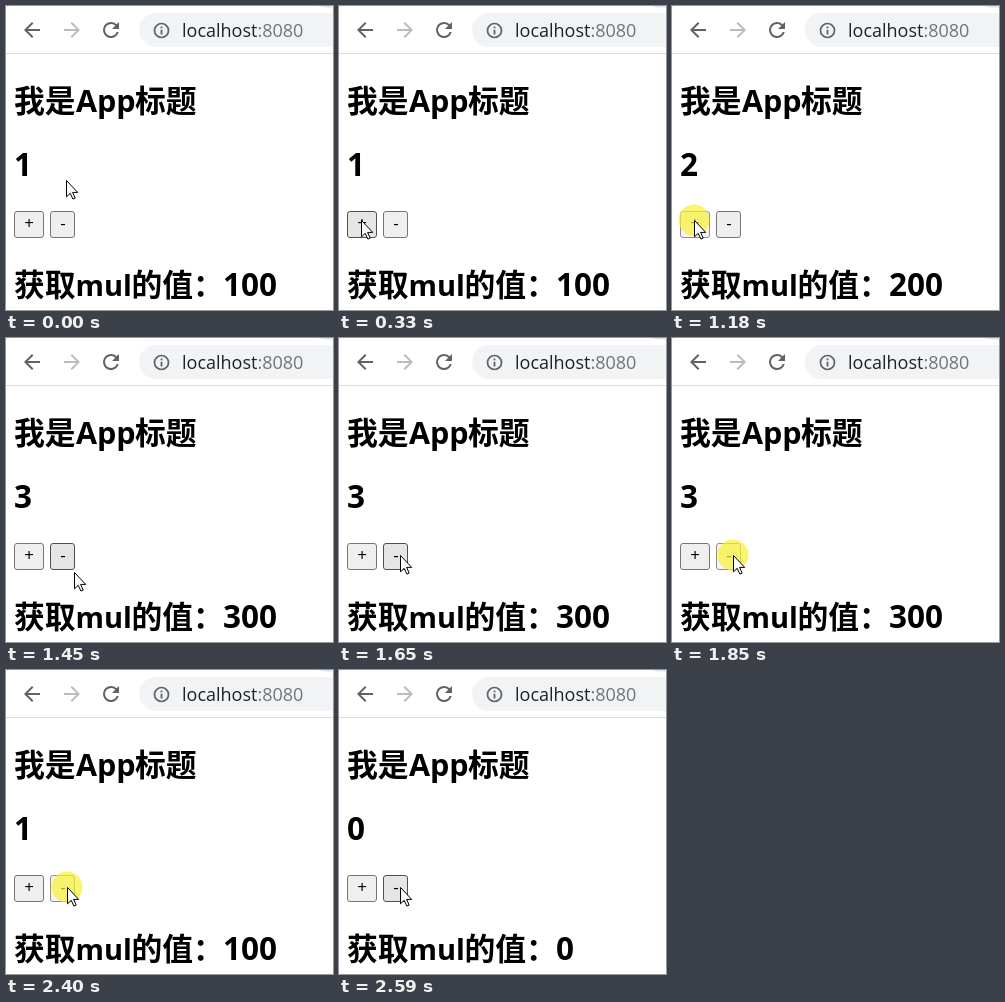
Animation, 327 px wide and 304 px high, one loop 3120 ms. Source, as an HTML page:

```html
<!DOCTYPE html>
<html lang="zh-CN">
<head>
<meta charset="utf-8">
<title>App</title>
<style>
  html, body { margin: 0; width: 100%; height: 100%; overflow: hidden; background: #fff; }
  svg { display: block; width: 100%; height: 100%; }
  text { white-space: pre; }
  .cjk { font: 700 30.8px "Noto Sans CJK SC", "Noto Sans CJK", sans-serif; }
  .latin { font: 700 30.5px "Open Sans", "Noto Sans", sans-serif; }
  .small { font-size: 29px; }
  .num { font-size: 31.5px; }
  .url { font: 18px "Open Sans", "Noto Sans", sans-serif; fill: #202124; }
  .port { fill: #70757a; }
  .btn rect { fill: #efefef; stroke: #767676; }
  .btn text { font: 17px "Open Sans", "Noto Sans", sans-serif; text-anchor: middle; }
  .btn.hover rect { fill: #e5e5e5; stroke: #4f4f4f; }
  .btn.press rect { fill: #f5f5f5; stroke: #8d8d8d; }
</style>
</head>
<body>
<svg viewBox="0 0 327 304">
  <defs>
    <path id="arrow" d="M20 11H7.83l5.59-5.59L12 4l-8 8 8 8 1.41-1.41L7.83 13H20z"/>
  </defs>
  <rect width="327" height="304" fill="#fff"/>

  <!-- browser bar -->
  <path d="M0 0h3l-3 1zM313 0h14v1.5q-11 0-14-1.5z" fill="#dee1e6"/>
  <rect y="47" width="327" height="1" fill="#dadce0"/>
  <rect x="133" y="7" width="260" height="34" rx="17" fill="#f1f3f4"/>
  <g fill="#5f6368">
    <use href="#arrow" x="14" y="12"/>
    <use href="#arrow" transform="translate(78 12) scale(-1 1)" fill="#babcbe"/>
    <path transform="translate(93 12)" d="M17.65 6.35A7.96 7.96 0 0 0 12 4a8 8 0 1 0 7.73 10h-2.08A6 6 0 1 1 12 6c1.66 0 3.14.69 4.22 1.78L13 11h7V4z"/>
    <circle cx="155.5" cy="24.5" r="7" fill="none" stroke="#5f6368" stroke-width="1.7"/>
    <path d="M154.6 20.5h1.8v1.8h-1.8zM154.6 23.8h1.8v4.7h-1.8z"/>
  </g>
  <text class="url" x="176" y="31">localhost<tspan class="port">:8080</tspan></text>

  <!-- page -->
  <text y="106"><tspan class="cjk" x="8">我是</tspan><tspan class="latin" x="70">App</tspan><tspan class="cjk" x="129">标题</tspan></text>
  <text id="count" class="latin num" x="8" y="170"></text>
  <g id="plus"><rect x="8.5" y="205.5" width="29" height="26" rx="2.5"/><text x="23" y="223">+</text></g>
  <g id="minus"><rect x="44.5" y="205.5" width="24" height="26" rx="2.5"/><text x="57" y="223">-</text></g>
  <text y="289.5"><tspan class="cjk" x="8">获取</tspan><tspan class="latin small" x="69.5">mul</tspan><tspan class="cjk" x="125.5">的值：</tspan><tspan id="mul" class="latin num" x="217"></tspan></text>

  <!-- pointer -->
  <g id="pointer">
    <circle id="glow" r="15.5" fill="#f8f032" fill-opacity=".7"/>
    <path d="M.5.5v16.3l3.7-3.5 2.7 5.8 2.3-1-2.6-5.7h5.1z" fill="#fff" stroke="#000"/>
  </g>
</svg>
<script>
  const LOOP = 3120;
  const $ = id => document.getElementById(id);

  // [time, x, y] of the pointer, held until the next entry
  const moves = [
    [0, 60, 174], [70, 58, 178], [140, 50, 190], [200, 38, 203], [270, 27, 211], [330, 22, 214],
    [1380, 48, 228], [1450, 68, 234], [1520, 65, 228], [1580, 62, 221], [1650, 61, 217]
  ];
  const hovers = [[0, ""], [270, "plus"], [1380, ""], [1450, "minus"]];
  // [press, release, step]
  const clicks = [[590, 720, 1], [1180, 1320, 1], [1850, 1920, -1], [2070, 2200, -1], [2400, 2590, -1]];

  const at = (list, t) => list.findLast(entry => entry[0] <= t);

  function render(t) {
    const [, x, y] = at(moves, t);
    const hover = at(hovers, t)[1];
    const pressed = clicks.some(([down, up]) => t >= down && t < up);
    const count = clicks.reduce((n, [, up, step]) => t >= up ? n + step : n, 1);

    $("count").textContent = count;
    $("mul").textContent = count * 100;
    for (const id of ["plus", "minus"]) {
      const state = id !== hover ? "" : pressed ? "press" : "hover";
      $(id).setAttribute("class", "btn " + state);
    }
    $("pointer").setAttribute("transform", `translate(${x} ${y})`);
    $("glow").setAttribute("visibility", pressed ? "visible" : "hidden");
  }

  const start = performance.now();
  function tick() {
    render((performance.now() - start) % LOOP);
    requestAnimationFrame(tick);
  }
  tick();
</script>
</body>
</html>
```
